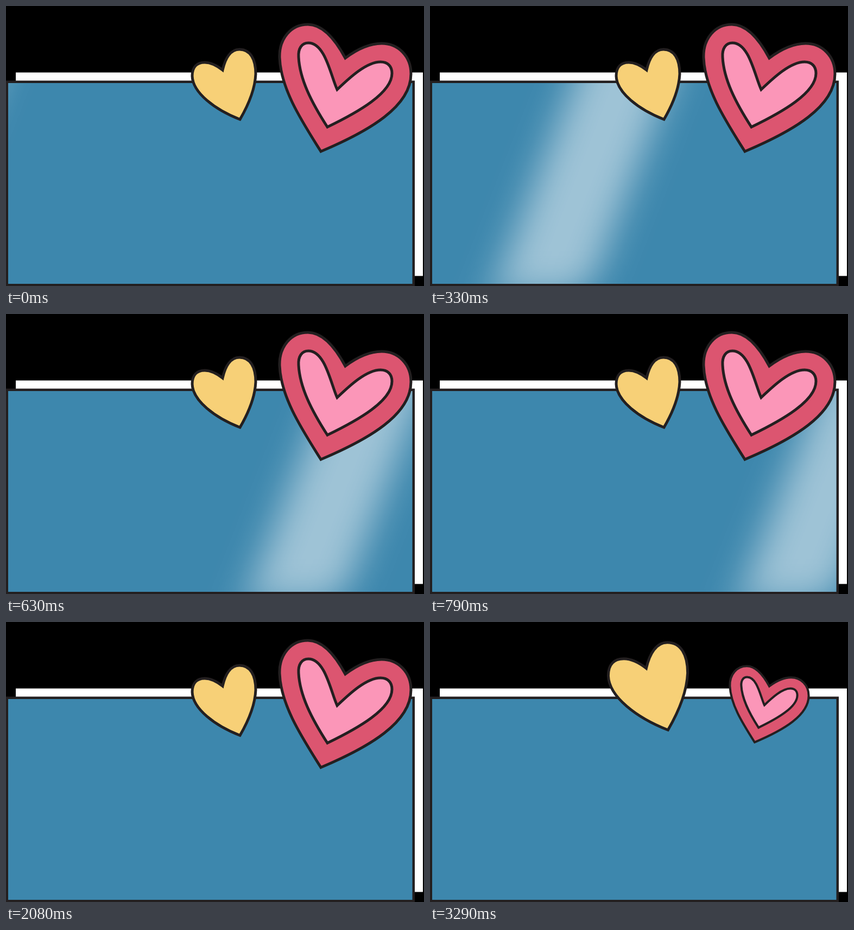
Write an HTML page that moves like this. It is 770 by 516 pixels and loops after 3.33 s.

```html
<!DOCTYPE html>
<html lang="en">
<head>
<meta charset="utf-8">
<title>Hearts and sheen</title>
<style>
  html, body { margin: 0; width: 100%; height: 100%; overflow: hidden; background: #000; }
  svg { display: block; width: 770px; height: 516px; }
  .heart path { stroke: #231f20; stroke-width: 5; vector-effect: non-scaling-stroke; }
</style>
</head>
<body>
<svg viewBox="0 0 770 516">
  <defs>
    <clipPath id="panel"><rect x="4" y="142" width="744.5" height="370"/></clipPath>
    <filter id="soft" filterUnits="userSpaceOnUse" x="-230" y="-260" width="460" height="800"
            color-interpolation-filters="sRGB">
      <feGaussianBlur stdDeviation="35"/>
    </filter>
  </defs>

  <rect x="18" y="122.5" width="750" height="375" fill="#fff"/>
  <rect y="137.5" width="753" height="378.5" fill="#231f20"/>
  <rect x="4" y="142" width="744.5" height="370" fill="#3d87ad"/>
  <g clip-path="url(#panel)">
    <rect id="sheen" x="-88" y="-150" width="176" height="540" fill="#fff" fill-opacity=".5" filter="url(#soft)"/>
  </g>

  <g id="yellow" class="heart">
    <path fill="#f7d077" d="M399 118C404 96 414 80 430 80C450 80 460 98 460 125C459 150 449 178 431 209
      C385 191 344 160 343 129C343 112 352 104 366 104C379 104 390 111 399 118Z"/>
  </g>
  <g id="pink" class="heart">
    <path fill="#dc5570" d="M625 96C603 55 580 34 556 34C525 34 503 60 504 95C506 150 540 205 580 268
      C670 230 746 185 746 125C746 92 722 69 692 69C668 69 645 81 625 96Z"/>
    <path fill="#fb96b8" d="M610 154C598 128 588 68 557 68C545 68 538 78 539 94C541 135 563 178 592 223
      C650 195 711 160 711 124C711 111 703 103 690 103C664 103 633 132 610 154Z"/>
  </g>
</svg>
<script>
  const LOOP = 3330, FPS = 24, STEPS = 80, BEAT = 20, SWEEP = 40;
  const [sheen, yellow, pink] = ['sheen', 'yellow', 'pink'].map(id => document.getElementById(id));

  const scaleAbout = (el, x, y, s) =>
    el.setAttribute('transform', `translate(${x} ${y}) scale(${s}) translate(${-x} ${-y})`);

  // Fast entry that slows down towards the right edge
  const sheenX = n => -113 + 59.5 * n / Math.cbrt(1 + (n / 20) ** 3);

  function draw(now) {
    const t = now % LOOP;
    const n = Math.min(STEPS - 1, Math.floor((t + 5) * FPS / 1000));
    const swapped = Math.floor(n / BEAT) % 2;

    scaleAbout(yellow, 401.5, 249, swapped ? 1.25 : 1);
    scaleAbout(pink, 625, 152, swapped ? 0.6 : 1);
    pink.querySelectorAll('path').forEach(p => p.style.strokeWidth = swapped ? 4 : 5);

    sheen.style.display = n < SWEEP ? '' : 'none';
    sheen.setAttribute('transform', `translate(${sheenX(n)} 142) skewX(-21.3)`);
  }

  const start = performance.now();
  function tick() {
    draw(performance.now() - start);
    requestAnimationFrame(tick);
  }
  tick();
</script>
</body>
</html>
```
